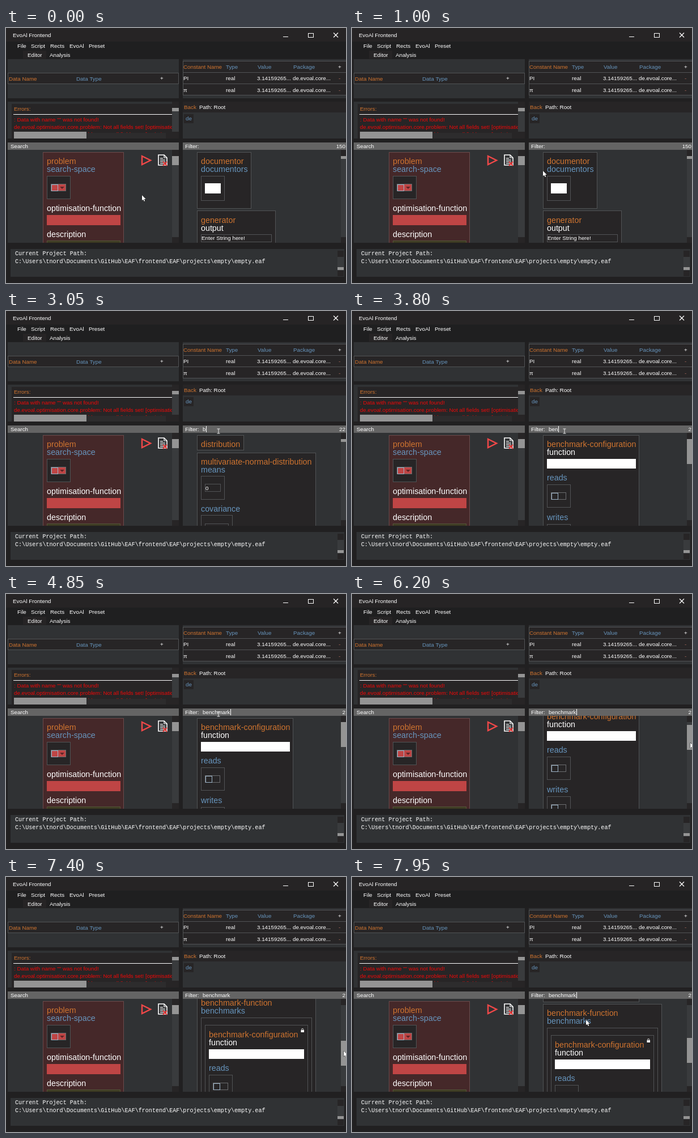
An HTML page with a canvas that plays this animation: 600 px wide and 450 px high, repeating every 8000 ms.

```html
<!DOCTYPE html>
<html lang="en">
<head>
<meta charset="utf-8">
<title>EvoAl Frontend</title>
<style>
  html, body { margin: 0; width: 100%; height: 100%; overflow: hidden; background: #212021; }
  canvas { display: block; }
</style>
</head>
<body>
<canvas id="stage" width="600" height="450"></canvas>
<script>
const ctx = document.getElementById('stage').getContext('2d');
const LOOP = 8000, STEP = 50;

const DARK = '#272526', PANEL = '#303234', BAR = '#646464', LINE = '#515355';
const WHITE = '#fff', ORANGE = '#cf7430', BLUE = '#6795bd', RED = '#f00808', ROSE = '#bf4545';
const SMALL = '9.8px "Liberation Sans", Arial, sans-serif';
const LARGE = '14.3px "Liberation Sans", Arial, sans-serif';
const MONO = '10.08px "Liberation Mono", "Courier New", monospace';

// Times at which each letter of the filter word appears.
const WORD = 'benchmark';
const KEY_TIMES = [2900, 3500, 3700, 3900, 4100, 4300, 4400, 4550, 4700];
const FOCUS_TIME = 2200;

// Keyframes: [time, value, ...]
const POINTER = [
  [0, 240, 295], [400, 240, 295], [1000, 337, 252], [1800, 375, 212], [5150, 375, 212],
  [5900, 597, 258], [6050, 597, 258], [6600, 598, 282], [7400, 596, 307], [7600, 596, 305], [7950, 413, 252]
];
const SCROLL = [[6050, 0], [6600, 103], [7200, 228], [7450, 228], [7700, 210]];

function track(keys, t) {
  if (t <= keys[0][0]) return keys[0].slice(1);
  const i = keys.findIndex(k => k[0] > t);
  if (i < 0) return keys.at(-1).slice(1);
  const a = keys[i - 1], b = keys[i];
  const u = (t - a[0]) / (b[0] - a[0]), e = u * u * (3 - 2 * u);
  return a.slice(1).map((v, n) => v + (b[n + 1] - v) * e);
}

// Rectangles are given by their left, top, right and bottom edges.
function fill(l, t, r, b, color) {
  ctx.fillStyle = color;
  ctx.fillRect(l, t, r - l, b - t);
}

function box(l, t, r, b, color = DARK, border = LINE) {
  fill(l, t, r, b, color);
  ctx.strokeStyle = border;
  ctx.lineWidth = 1;
  ctx.strokeRect(l + .5, t + .5, r - l - 1, b - t - 1);
}

function text(str, x, y, color = WHITE, font = SMALL) {
  ctx.font = font;
  ctx.fillStyle = color;
  ctx.fillText(str, x, y);
}

const label = (str, x, y, color = WHITE) => text(str, x, y, color, LARGE);

function path(points, color, width, close) {
  ctx.beginPath();
  points.forEach(p => ctx.lineTo(...p));
  if (close) ctx.closePath();
  ctx.strokeStyle = color;
  ctx.lineWidth = width;
  ctx.stroke();
}

function clipped(l, t, r, b, draw) {
  ctx.save();
  ctx.beginPath();
  ctx.rect(l, t, r - l, b - t);
  ctx.clip();
  draw();
  ctx.restore();
}

function scrollbar(l, t, r, b, thumbTop, thumbBottom) {
  fill(l, t, r, b, '#393b3d');
  fill(l, t, r, t + 11, DARK);
  fill(l, b - 10, r, b, DARK);
  fill(l, thumbTop, r, thumbBottom, '#949494');
}

function dropdown(x, y, color = DARK) {
  box(x, y, x + 27, y + 13, color, '#6b6d6f');
  box(x + 1, y + 1, x + 13, y + 13, color, '#9db4c8');
  if (color === DARK) return;
  ctx.fillStyle = '#5e2426';
  ctx.beginPath();
  ctx.moveTo(x + 16, y + 5);
  ctx.lineTo(x + 24, y + 5);
  ctx.lineTo(x + 20, y + 9);
  ctx.fill();
}

function drawHeader() {
  fill(0, 0, 600, 24, '#262425');
  fill(0, 24, 600, 54, '#1f1f20');
  fill(30, 40, 71, 54, '#262425');
  text('EvoAl Frontend', 12, 16);
  path([[489, 15.5], [498, 15.5]], WHITE, 1);
  ctx.strokeRect(533.5, 9.5, 9, 7);
  path([[578, 8.5], [586, 16.5]], WHITE, 1.3);
  path([[586, 8.5], [578, 16.5]], WHITE, 1.3);
  [['File', 20], ['Script', 44], ['Rects', 78], ['EvoAl', 112], ['Preset', 146]]
    .forEach(([name, x]) => text(name, x, 35));
  text('Editor', 38, 51);
  text('Analysis', 77, 51);
}

function drawTables() {
  fill(3, 55, 305, 124, PANEL);
  box(3, 79, 305, 99);
  text('Data Name', 5, 93, ORANGE);
  text('Data Type', 124, 93, BLUE);
  text('+', 272, 92);

  fill(312, 55, 600, 124, PANEL);
  [58, 78, 98].forEach(y => box(312, y, 601, y + 21));
  text('Constant Name', 313, 72, ORANGE);
  text('Type', 388, 72, BLUE);
  text('Value', 444, 72, BLUE);
  text('Package', 507, 72, BLUE);
  text('+', 586, 72);
  [['PI', 92], ['π', 113]].forEach(([name, y]) => {
    text(name, 313, y);
    text('real', 388, y);
    text('3.14159265...', 443, y);
    text('de.evoal.core...', 506, y);
    text('-', 587, y, '#b06a5c');
  });
}

function drawErrors() {
  fill(3, 130, 305, 195, PANEL);
  fill(10, 134, 293, 195, DARK);
  text('Errors:', 14, 146, ORANGE);
  fill(13, 152, 294, 153, WHITE);
  clipped(10, 154, 294, 185, () => {
    text(': Data with name "" was not found!', 14, 165, RED);
    text('de.evoal.optimisation.core.problem: Not all fields set! [optimisation', 14, 178, RED);
    text('de.evoal.optimisation.core.problem: Not all fields set! [optimisation', 14, 191, RED);
  });
  fill(142, 185, 282, 195, '#2d2c2d');
  fill(14, 183, 142, 195, '#949494');
  fill(293, 130, 305, 195, '#393b3d');
  fill(293, 130, 305, 141, DARK);
  fill(293, 141, 305, 147, '#949494');
  fill(282, 183, 305, 195, DARK);

  fill(312, 130, 600, 195, PANEL);
  fill(312, 130, 600, 149, DARK);
  text('Back', 314, 143, ORANGE);
  text('Path: Root', 341, 143);
  fill(314, 152, 331, 168, DARK);
  text('de', 317, 163, BLUE);
}

function drawSearch() {
  fill(3, 202, 305, 215, BAR);
  text('Search', 8, 212);
  fill(3, 215, 305, 379, PANEL);
  clipped(3, 215, 293, 379, () => {
    box(65, 219, 208, 400, '#452829', '#6c4a4b');
    label('problem', 72, 240, ORANGE);
    label('search-space', 72, 254, BLUE);
    box(72, 261, 114, 302);
    dropdown(79, 275, ROSE);
    label('optimisation-function', 72, 323);
    fill(72, 330, 202, 348, ROSE);
    label('description', 72, 369);
    box(72, 375, 202, 390, '#3d3b22', '#55533a');
    text('Enter String here!', 73, 386);
  });
  path([[240, 226], [255, 233.5], [240, 241]], '#f04848', 2.5, true);
  path([[269, 224], [279, 224], [284, 229], [284, 242], [269, 242]], WHITE, 1.6, true);
  path([[279, 224], [279, 229], [284, 229]], WHITE, 1.2);
  [230, 233, 236, 239].forEach((y, i) => path([[272, y], [i ? 281 : 277, y]], WHITE, 1.2));
  path([[277, 236], [284, 243]], '#f03838', 1.8);
  path([[284, 236], [277, 243]], '#f03838', 1.8);
  scrollbar(293, 215, 305, 379, 226, 242);
}

function drawAllItems() {
  box(337, 219, 433, 319);
  label('documentor', 344, 240, ORANGE);
  label('documentors', 344, 254, BLUE);
  box(344, 261, 386, 305);
  fill(351, 274, 379, 292, WHITE);
  box(337, 322, 476, 420);
  label('generator', 344, 344, ORANGE);
  label('output', 344, 358);
  box(344, 364, 469, 378);
  text('Enter String here!', 345, 374);
}

function drawDistributions() {
  box(337, 219, 420, 246);
  label('distribution', 344, 240, ORANGE);
  box(337, 250, 547, 420);
  label('multivariate-normal-distribution', 344, 271, ORANGE);
  label('means', 344, 285, BLUE);
  box(344, 291, 386, 333);
  box(351, 305, 379, 319);
  text('0', 352, 316);
  label('covariance', 344, 354, BLUE);
  box(344, 360, 400, 420);
  box(351, 375, 393, 410);
}

function slot(name, x, y) {
  label(name, x, y, BLUE);
  box(x, y + 7, x + 42, y + 48);
  dropdown(x + 7, y + 21);
}

function configuration(x, y, width) {
  label('benchmark-configuration', x, y, ORANGE);
  label('function', x, y + 14);
  fill(x, y + 21, x + width, y + 38, WHITE);
  slot('reads', x, y + 59);
}

function drawBenchmarks() {
  box(337, 219, 507, 431);
  configuration(344, 240, 157);
  slot('writes', 344, 369);
  box(337, 434, 547, 760);
  label('benchmark-function', 344, 455, ORANGE);
  label('benchmarks', 344, 469, BLUE);
  box(344, 476, 540, 750);
  box(351, 489, 533, 740);
  configuration(358, 511, 168);
  fill(520.5, 498, 526, 502, WHITE);
  ctx.beginPath();
  ctx.arc(523.2, 497.5, 1.8, Math.PI, 0);
  ctx.strokeStyle = WHITE;
  ctx.lineWidth = 1;
  ctx.stroke();
}

function drawFilter(t) {
  const typed = WORD.slice(0, KEY_TIMES.filter(k => k <= t).length);
  const [offset] = track(SCROLL, t);
  const views = [['150', drawAllItems], ['22', drawDistributions], ['2', drawBenchmarks]];
  const [count, drawItems] = views[Math.min(typed.length, 2)];

  fill(312, 202, 600, 215, BAR);
  text('Filter:', 316, 212);
  text(typed, 347, 212);
  const caretX = Math.round(347.5 + ctx.measureText(typed).width);
  if (t >= FOCUS_TIME && (t + 250) % 1000 < 500) fill(caretX, 203, caretX + 1, 214, WHITE);
  ctx.textAlign = 'right';
  text(count, 599, 212);
  ctx.textAlign = 'left';

  fill(312, 215, 600, 379, PANEL);
  clipped(312, 215, 591, 379, () => {
    ctx.translate(0, -Math.round(offset));
    drawItems();
  });
  const top = 226 + Math.round(offset * .277);
  scrollbar(591, 215, 600, 379, top, top + (typed.length > 1 ? 44 : 5));
}

function drawConsole() {
  fill(8, 390, 597, 439, PANEL);
  text('Current Project Path:', 16, 401, WHITE, MONO);
  text('C:\\Users\\tnord\\Documents\\GitHub\\EAF\\frontend\\EAF\\projects\\empty\\empty.eaf', 16, 415, WHITE, MONO);
  fill(585, 393, 596, 438, '#393b3d');
  fill(585, 393, 596, 404, DARK);
  fill(585, 428, 596, 438, DARK);
  fill(585, 422, 596, 427, '#949494');
}

function drawPointer(t) {
  const [x, y] = track(POINTER, t);
  if (x > 345 && y < 215) {
    path([[x, y - 4], [x, y + 4]], '#e8e8e8', 1);
    path([[x - 2.5, y - 4], [x + 2.5, y - 4]], '#e8e8e8', 1);
    path([[x - 2.5, y + 4], [x + 2.5, y + 4]], '#e8e8e8', 1);
    return;
  }
  const arrow = [[0, 0], [0, 9.5], [2.2, 7.5], [3.8, 11], [5.3, 10.3], [3.8, 7], [6.8, 7]];
  path(arrow.map(([dx, dy]) => [x + dx, y + dy]), '#111', 1, true);
  ctx.fillStyle = WHITE;
  ctx.fill();
}

function render(now) {
  const t = Math.floor(now % LOOP / STEP) * STEP;
  fill(0, 0, 600, 450, '#212021');
  drawHeader();
  drawTables();
  drawErrors();
  drawSearch();
  drawFilter(t);
  drawConsole();
  drawPointer(t);
}

const start = performance.now();
function frame() {
  render(performance.now() - start);
  requestAnimationFrame(frame);
}
frame();
</script>
</body>
</html>
```
